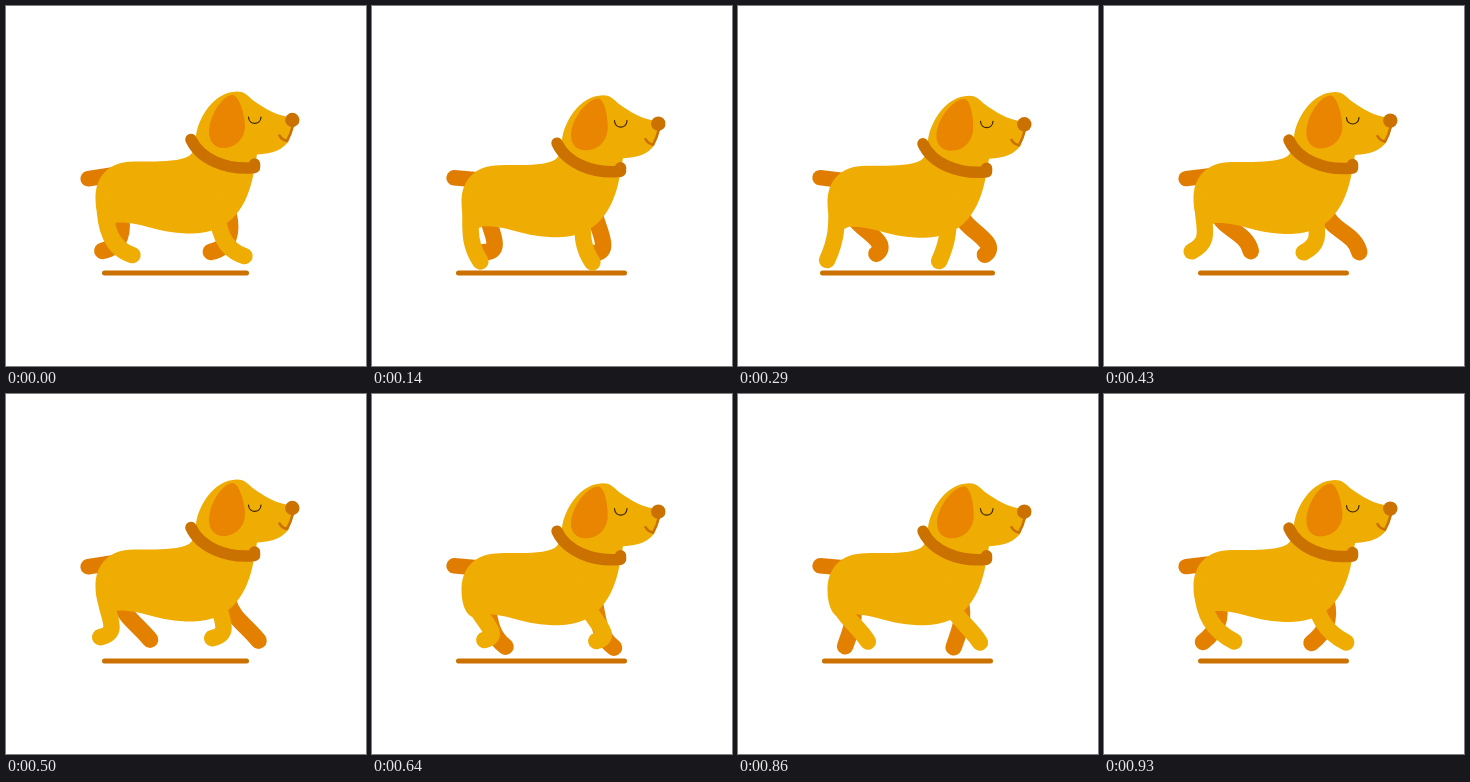
Recreate the animation shown at these times as an HTML page. Size 360 by 360 pixels, loop 1000 ms.

```html
<!DOCTYPE html>
<html lang="en">
<head>
<meta charset="utf-8">
<title>Walking dog</title>
<style>
  html, body { margin: 0; width: 100%; height: 100%; overflow: hidden; background: #fff; }
  svg { display: block; width: 100vw; height: 100vh; }
  path { fill: none; stroke-linecap: round; stroke-linejoin: round; }
  .leg { stroke-width: 16.5; }
  .far { stroke: #e48000; }
  .near { stroke: #efad04; }
  .dark { stroke: #cb7100; }
</style>
</head>
<body>
<svg viewBox="0 0 360 360">
  <path id="ground" class="dark" stroke-width="5"/>
  <path id="tail" stroke="#e07c00" stroke-width="15.5" d="M82 171H105"/>
  <path id="farRear" class="leg far"/>
  <path id="farFront" class="leg far" transform="translate(108.5 1)"/>
  <g id="body">
    <path style="fill:#efad04" d="M231 85.5C207 86 192 113 190 130C189 143 187 147 183 150C170 157 145 155 128 155.5C102 155.5 89.5 171 89.5 192C89.5 206 94 220 104 219.5L111 216.5C140 216 148 227.5 187 227.5C225 227 242 200 248 165L251 148.5C267 148 277 143 282 136L289 118L280 110.5C264 107 254 99 246 93.5C241 89 238 85.5 231 85.5Z"/>
    <path class="dark" stroke-width="2.6" d="M287 119Q285 128 281 135Q276 134 273.5 129.5"/>
    <circle cx="286.3" cy="114" r="7.2" fill="#cb7100"/>
    <path stroke="#3a2600" stroke-width="1.2" d="M242.5 111C243 119.5 254.500 119.5 255 111"/>
    <path id="ear" style="fill:#e98500" d="M226 89C214 91 203 112 203 126C203 136 209 142 217 142C230 142 239 132 239 120C239 110 233 88 226 89Z"/>
    <path class="dark" stroke-width="11.5" d="M185 133.5C194 153 220 164.5 248.500 161.5V158"/>
  </g>
  <path id="nearRear" class="leg near"/>
  <path id="nearFront" class="leg near" transform="translate(112 1)"/>
</svg>
<script>
const $ = id => document.getElementById(id);
const STEPS = 14, TURN = 2 * Math.PI / STEPS;

// A swing that peaks at a given step, with an optional swing at double speed.
const wave = (mean, amp, peak, amp2 = 0, peak2 = 0) => step =>
  mean + amp * Math.cos(TURN * (step - peak)) + amp2 * Math.cos(2 * TURN * (step - peak2));

// Foot position, and ankle lean in degrees (positive is forward).
const legs = {
  near: {
    hip: "98.5 196", thigh: "99 221", shin: 23,
    x: wave(109.3, 22.3, 12.3, 1.7, 1),
    y: wave(249, 4.7, 2, 3.1, 3.1),
    lean: wave(12, 76, 7.3, 12, 2.8)
  },
  far: {
    hip: "114 207", thigh: "118 223", shin: 20,
    x: wave(123.8, 24.5, 6.5, 4, 4),
    y: wave(248.6, 4, 10.3, 3.3, 3.5),
    lean: wave(20, 75, 1.5)
  }
};

function drawLeg(name, step) {
  const leg = legs[name], x = leg.x(step), y = leg.y(step);
  const a = leg.lean(step) * Math.PI / 180;
  const ankle = `${x + leg.shin * Math.sin(a)} ${y - leg.shin * Math.cos(a)}`;
  for (const end of ["Rear", "Front"])
    $(name + end).setAttribute("d", `M${leg.hip}C${leg.thigh} ${ankle} ${x} ${y}`);
}

// How far the body has sunk (0 to 1); it bounces twice per loop.
function sinkAt(step) {
  const s = Math.min(1, 1.25 * Math.sin(TURN * step) ** 2);
  return s * s * (3 - 2 * s);
}

function draw(now) {
  const t = now % 1000;
  let step = STEPS - 1;
  while (Math.round(step * 100 / STEPS) * 10 > t) step--;

  const sink = sinkAt(step), half = 71 + 14 * sink;
  $("ground").setAttribute("d", `M${169.5 - half} 267H${169.5 + half}`);
  $("body").setAttribute("transform", `translate(0 ${4.3 * sink})`);
  $("ear").setAttribute("transform", `rotate(${7.5 * sink} 228 90)`);
  $("tail").setAttribute("transform", `translate(0 ${2 * sink}) rotate(${-9 + 16 * sink} 93 171)`);
  drawLeg("far", step);
  drawLeg("near", step);
  requestAnimationFrame(draw);
}

draw(0);
</script>
</body>
</html>
```
